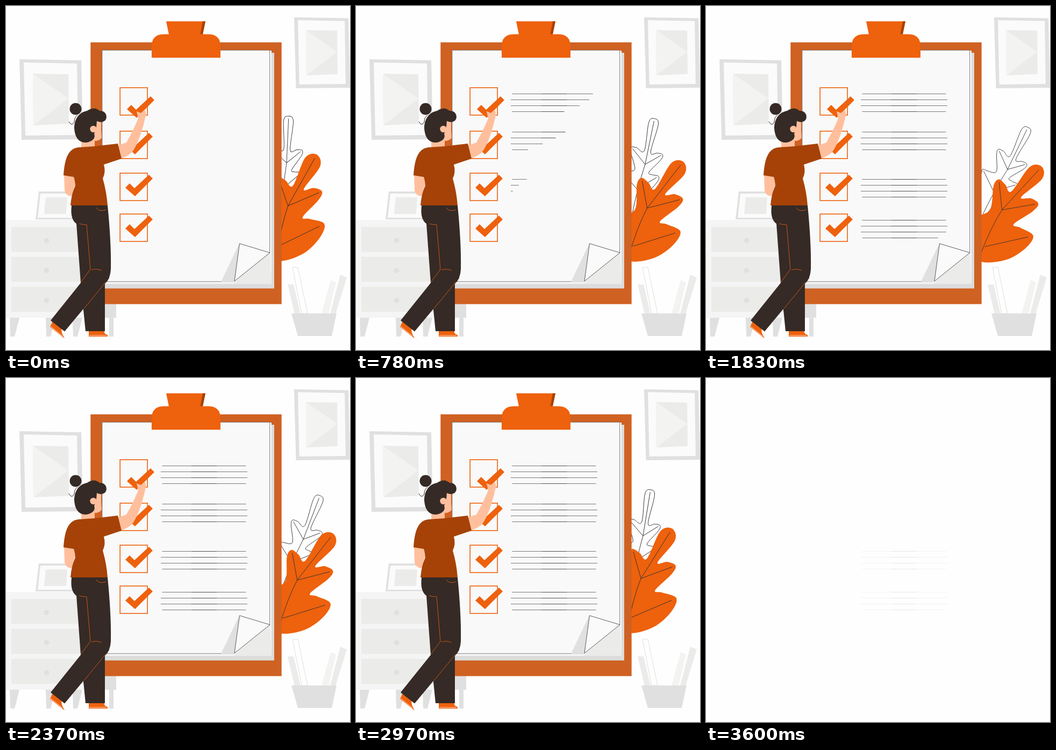
Write an HTML page with a canvas that moves like this. It is 640 px wide and 640 px high and loops after 3630 ms.

```html
<!DOCTYPE html>
<html lang="en">
<head>
<meta charset="utf-8">
<title>Checklist</title>
<style>
html, body { margin: 0; width: 100%; height: 100%; overflow: hidden; background: #fefefe; }
canvas { display: block; width: 640px; height: 640px; }
</style>
</head>
<body>
<canvas id="stage" width="640" height="640"></canvas>
<script>
const ctx = document.getElementById('stage').getContext('2d');
const LOOP = 3630, STEP = 30;
const BG = '#fefefe', ORANGE = '#ee610d', RUST = '#a64207', DARK = '#352a25',
  SKIN = '#ffbf9d', GREY = '#e0e0e0', MID = '#ebebe9', PALE = '#f5f5f5', INK = '#333';

const clamp = v => Math.min(1, Math.max(0, v));
const sine = v => (1 - Math.cos(Math.PI * clamp(v))) / 2;
const mix = (a, b, k) => a + (b - a) * k;

function fill(color, d) {
  ctx.fillStyle = color;
  ctx.fill(new Path2D(d));
}
function stroke(color, width, d) {
  ctx.strokeStyle = color;
  ctx.lineWidth = width;
  ctx.stroke(new Path2D(d));
}
function rect(color, x1, y1, x2, y2) {
  ctx.fillStyle = color;
  ctx.fillRect(x1, y1, x2 - x1, y2 - y1);
}
function dot(color, x, y, r) {
  ctx.fillStyle = color;
  ctx.beginPath();
  ctx.arc(x, y, r, 0, 2 * Math.PI);
  ctx.fill();
}
function placed(x, y, scale, angle, paint) {
  ctx.save();
  ctx.translate(x, y);
  ctx.scale(scale, scale);
  ctx.rotate(angle);
  paint();
  ctx.restore();
}

// Closed Catmull-Rom curve
function smooth(points) {
  const path = new Path2D(), n = points.length;
  const at = i => points[(i + n) % n];
  path.moveTo(...at(0));
  for (let i = 0; i < n; i++) {
    const [a, b, c, d] = [at(i - 1), at(i), at(i + 1), at(i + 2)];
    path.bezierCurveTo(b[0] + (c[0] - a[0]) / 6, b[1] + (c[1] - a[1]) / 6,
      c[0] - (d[0] - b[0]) / 6, c[1] - (d[1] - b[1]) / 6, ...c);
  }
  return path;
}

const lobe = (from, to, r) => ({ from, to, r });

// A round cap on every vein, a notch between neighbours, then the stem end
function makeLeaf(lobes, notch, stem) {
  const points = [], veins = new Path2D();
  lobes.forEach(({ from, to, r }, i) => {
    const length = Math.hypot(to[0] - from[0], to[1] - from[1]);
    const dx = (to[0] - from[0]) / length * r, dy = (to[1] - from[1]) / length * r;
    points.push([to[0] + dy, to[1] - dx], [to[0] + dx, to[1] + dy], [to[0] - dy, to[1] + dx]);
    veins.moveTo(...from);
    veins.lineTo(to[0] + dx / 2, to[1] + dy / 2);
    const next = lobes[i + 1];
    if (next) points.push([0, 1].map(axis =>
      (mix(from[axis], to[axis], notch) + mix(next.from[axis], next.to[axis], notch)) / 2));
  });
  return { outline: smooth([...points, ...stem]), veins };
}

const fork = [552, 380], lowFork = [519, 448];
const orangeLeaf = makeLeaf([
  lobe(fork, [548, 334], 11), lobe(fork, [616, 312], 16),
  lobe(fork, [608, 371], 12), lobe(lowFork, [590, 433], 20)
], 0.6, [[558, 473], [513, 476], [490, 455], [502, 398], [530, 379]]);
orangeLeaf.veins.moveTo(...fork);
orangeLeaf.veins.quadraticCurveTo(531, 412, 511, 462);

const paleFork = [561, 304], paleLow = [535, 345], paleBase = [512, 394];
const paleLeaf = makeLeaf([
  lobe(paleLow, [518, 310], 7), lobe(paleFork, [547, 273], 7), lobe(paleFork, [595, 234], 9),
  lobe(paleFork, [590, 296], 7), lobe(paleLow, [572, 334], 8)
], 0.5, [[538, 368], paleBase, [498, 350]]);
paleLeaf.veins.moveTo(...paleFork);
paleLeaf.veins.quadraticCurveTo(...paleLow, ...paleBase);

function drawLeaf(leaf, color, edge, x, y, angle) {
  placed(x, y, 1, angle, () => {
    ctx.translate(-x, -y);
    ctx.fillStyle = color;
    ctx.fill(leaf.outline);
    ctx.strokeStyle = INK;
    ctx.lineWidth = 0.9;
    ctx.stroke(leaf.veins);
    if (edge) ctx.stroke(leaf.outline);
  });
}

function leaves(t) {
  const pale = sine(t / 1815) - sine(t / 1815 - 1);
  const bright = sine(t / 1400) - sine((t - 1400) / 2200);
  drawLeaf(paleLeaf, BG, true, 512, 392, 0.408 * pale - 0.408);
  drawLeaf(orangeLeaf, ORANGE, false, 505, 488, 0.253 * bright - 0.243);
}

function wallPicture() {
  fill(GREY, 'M0 0L115 2L118 149L4 150Z');
  fill('#fbfbfb', 'M8 6L107 8L109 141L11 142Z');
  fill(MID, 'M25 27L91 28L92 120L26 123Z');
  fill('#f3f3f2', 'M25 27L91 73L26 123Z');
}

function room() {
  placed(25, 99, 1, 0, wallPicture);
  placed(536, 21, 0.88, 0, wallPicture);

  fill(GREY, 'M61 345H132L127 397H55Z');
  fill('#fbfbfb', 'M64 349H130L126 394H59Z');
  fill(MID, 'M74 356H114L112 387H71Z');

  for (const x of [7, 74, 124]) fill(GREY, `M${x} 580h18l-9 35h-8Z`);
  rect(GREY, 150, 398, 205, 580);
  rect(GREY, 192, 580, 200, 615);
  rect(PALE, 1, 398, 152, 580);
  for (let i = 0; i < 3; i++) {
    const y = 411 + 55.7 * i;
    rect(MID, 10, y, 146, y + 46.5);
    dot(GREY, 75.5, y + 25.5, 4.8);
  }

  fill(MID, 'M524 518H535L548 573H537ZM622 500L634 505L613 573H603Z');
  fill('#f3f3f2', 'M604 510L614 514L600 573H587Z');
  stroke(GREY, 1, 'M533 486H543L561 572H550Z');
  fill(GREY, 'M531 572H615L606 614H543Z');
}

// Top of the box, top of the text and shift of the tick
const items = [
  { box: 152, text: 163.5, tick: [3, 13] },
  { box: 232.8, text: 234.5, tick: [0, 0.2] },
  { box: 311, text: 322.5, tick: [0, 0] },
  { box: 387, text: 398.5, tick: [0, 0] }
];

function clipboard() {
  rect('#cf6122', 157.3, 67.6, 512.7, 554.6);
  rect('#dcdcdc', 184, 87, 499, 525.5);
  rect(PALE, 181, 83, 494, 517);
  rect('#f9f9f9', 178.7, 82, 491, 513);
  fill(MID, 'M425 513L491 459L494 517H425Z');
  stroke(INK, 0.6, 'M425 512.7H178.9V82.3H490.6V459');
  fill(GREY, 'M434 442L400 513H425Z');
  fill('#fafafa', 'M434.5 442L491 459L425 512Z');
  stroke(INK, 0.8, 'M425 512L434.5 442L491 459L425 512');

  fill(ORANGE, 'M298 28.5H371L366 53H303Z');
  fill(RUST, 'M366 28.5H371L366 52.5H361.5Z');
  fill(ORANGE, 'M271 96.3V75Q271 53 293 52.5H377Q399 53 399 75V96.3Z');

  for (const { box, tick } of items) {
    ctx.strokeStyle = ORANGE;
    ctx.lineWidth = 1.6;
    ctx.strokeRect(212.2, box, 51, 51);
    placed(tick[0], box - 311 + tick[1], 1, 0, () =>
      fill(ORANGE, 'M222 338L230 330L239 339L266 314L273 321L240 354Z'));
  }
}

function woman() {
  // Shoes
  fill(ORANGE, 'M87 586L104 599Q101 605 109 618.5L82 597Z');
  fill(ORANGE, 'M154 604H183Q181 609 189 612V615H154Z');
  stroke('#ffd9c4', 1, 'M83 596L105 614M155 613H187');

  // Trousers
  fill(DARK, `M122 371H189Q196 440 195 490Q194 508 184 517V605H148L139 515L131 405
    Q119 397 122 371Z`);
  fill(DARK, 'M157 491L192 506L109 605.5L83 585L140 514Z');
  stroke('#c7551a', 1, `M136 405Q143 407 150 407L157 490L139 514M159 491Q168 488 178 492
    M186 513L145 563M168 375Q173 384 186 379`);

  // Arms and head
  fill(SKIN, 'M108 314L128 318Q129 326 129 333Q123 341 125 354Q110 354 109 342Z');
  fill(SKIN, `M207 260L224 254Q238 229 246 209L243 196L251 199L258 193Q262 198 259 208
    Q250 247 238 267Q233 277 213 284Z`);
  fill(SKIN, 'M140 245L160 212H177V232L178 245Q174 251 165 251V266H140Z');
  stroke(DARK, 1, 'M117 215Q122 225 127 216Q127 207 133 203');
  dot(DARK, 129.5, 191.5, 11);
  fill(DARK, `M127 228C127 207 139 197 151 195Q164 186 174 195C188 194 190 210 183 214
    Q177 218 169 214L168 226L164 238C168 248 156 254 147 254Q129 253 127 228Z`);
  dot(SKIN, 162.5, 229, 6.2);

  // Shirt
  fill(RUST, `M135 263L165 261L208 256L215 284L182 295Q186 309 180 321Q187 345 189 371H120
    Q122 348 129 334Q128 323 126 318L107 315C109 290 113 265 135 263Z`);
}

function textLines(t, group) {
  for (let row = 0; row < 4; row++) {
    const start = group * (250 + 11 * group) + row * (57 + 11 * row) - 10;
    const shown = sine((t - start) / 900);
    if (shown < 0.005) continue;
    const inset = row % 3 ? 0 : 2.5;
    const left = 288 + inset, right = 449 - inset;
    const end = mix(left, right, shown), y = items[group].text + 11 * row;
    stroke(INK, 0.65, `M${left} ${y}H${end}`);
    // Each rule is heavier around its middle
    const middle = mix(left, right, 0.35);
    if (end > middle) stroke(INK, 0.6, `M${middle} ${y}H${Math.min(end, mix(left, right, 0.65))}`);
  }
}

function draw(t) {
  ctx.globalAlpha = 1;
  rect(BG, 0, 0, 640, 640);
  room();
  leaves(t);
  clipboard();
  textLines(t, 0);
  textLines(t, 1);
  woman();

  ctx.globalAlpha = clamp((t - 3250) / 350);
  rect(BG, 0, 0, 640, 640);
  ctx.globalAlpha = clamp((LOOP - t) / 350);
  textLines(t, 2);
  textLines(t, 3);
}

const begin = performance.now();
function tick() {
  const t = (performance.now() - begin) % LOOP;
  draw(Math.floor(t / STEP) * STEP);
  requestAnimationFrame(tick);
}
tick();
</script>
</body>
</html>
```
